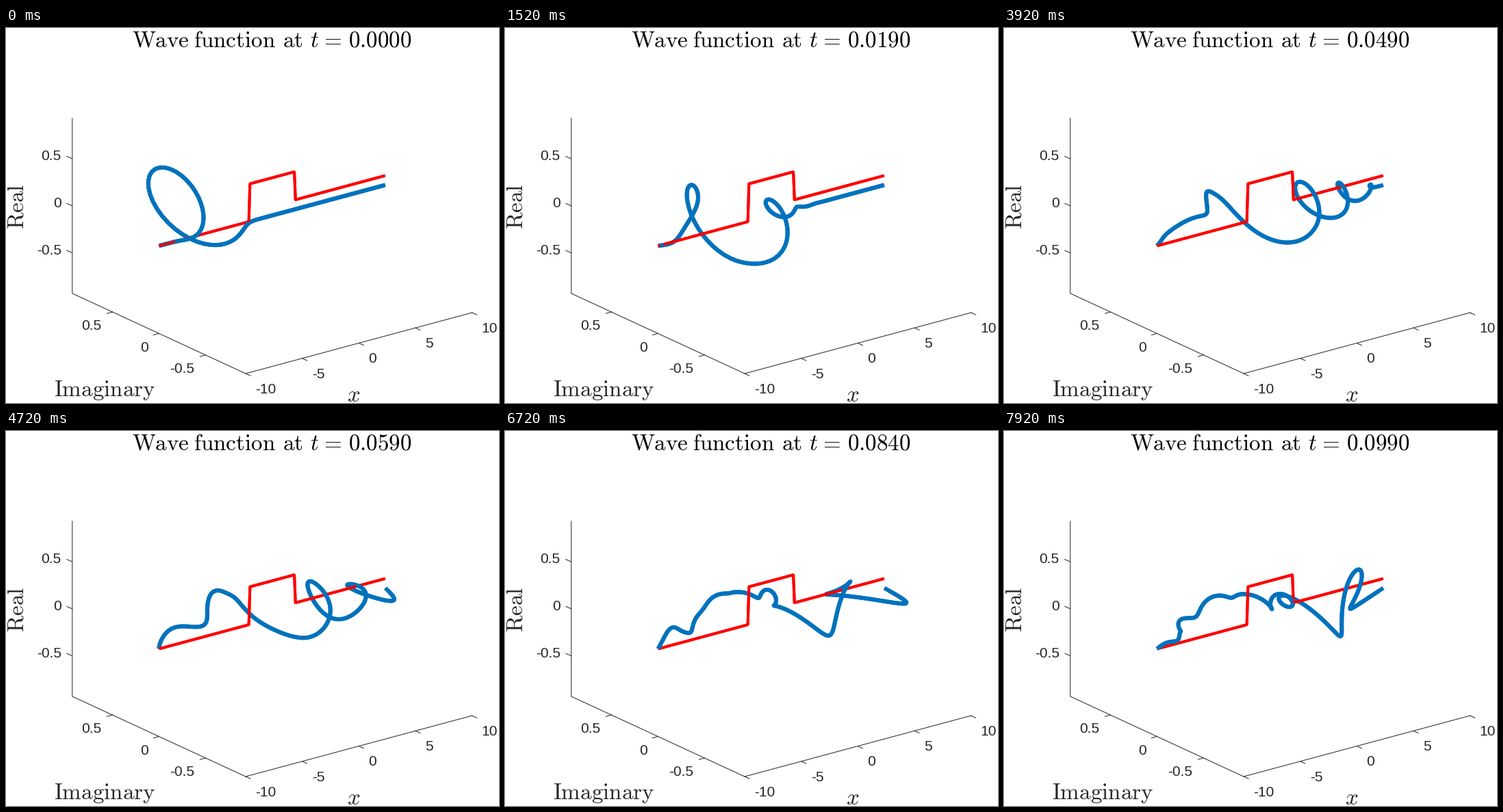
Animation, 720 px wide and 548 px high, one loop 8000 ms. Source, as a matplotlib script:

```python
import numpy as np
import matplotlib.pyplot as plt
from matplotlib.animation import FuncAnimation
from matplotlib.collections import LineCollection

plt.rcParams["mathtext.fontset"] = "cm"

W, H, DPI = 720, 548, 100
FRAMES, INTERVAL = 100, 80
PX = 72 / DPI
BLUE, RED, GREY = "#0072BD", "#FF0000", "#262626"

# Natural units (hbar = m = 1); the clock shows a hundredth of natural time
DT = 0.001
TIME_SCALE = 100

x = np.linspace(-10, 10, 200)
dx = x[1] - x[0]
V = np.where(x > 2, 0.1, np.where(x > -2, 0.4, 0.0))
psi0 = np.pi ** -0.25 * np.exp(-(x + 5) ** 2 / 2 + 1j * x)

# Evolve exactly in the energy eigenbasis, with walls at both ends
hop = 0.5 / dx ** 2
n = len(x) - 2
ham = np.diag(2 * hop + V[1:-1]) - hop * (np.eye(n, k=1) + np.eye(n, k=-1))
energy, modes = np.linalg.eigh(ham)
coef = modes.T @ psi0[1:-1]


def wave(t):
    psi = np.zeros(len(x), complex)
    psi[1:-1] = modes @ (coef * np.exp(-1j * energy * t * TIME_SCALE))
    return psi


# Orthographic view
LIM = 0.931
CENTRE = np.array([388.2, 273.4])
EX, EI, ER = np.array([[16.53, -4.45], [-136.0, -62.9], [0, -137.5]])


def project(x, im, re):
    x, im, re = np.broadcast_arrays(x, im, re)
    return CENTRE + x[..., None] * EX + im[..., None] * EI + re[..., None] * ER


def nearness(x, im, re):
    return -11.8 * x - 166.8 * im + 51.9 * re


def pieces(im, re):
    """Overlapping three-point strokes and their nearness to the viewer."""
    p = project(x, im, re)
    return np.stack([p[:-2], p[1:-1], p[2:]], axis=1), nearness(x, im, re)[1:-1]


fig = plt.figure(figsize=(W / DPI, H / DPI), dpi=DPI, facecolor="white")
ax = fig.add_axes([0, 0, 1, 1])
ax.set_xlim(-0.5, W - 0.5)
ax.set_ylim(H - 0.5, -0.5)
ax.axis("off")


def line(points):
    ax.plot(*np.transpose(points), color=GREY, lw=PX)


def tick(pos, step, text, offset, ha):
    line([pos, pos + np.array(step)])
    ax.text(*(pos + np.array(offset)), text, ha=ha, va="center_baseline",
            family="Liberation Sans", size=21 * PX, color=GREY)


def latex(px, py, text, color=GREY, **kw):
    return ax.text(px, py, f"${text}$", size=33.1 * PX, color=color, **kw)


line([project(-10, LIM, LIM), project(-10, LIM, -LIM),
      project(-10, -LIM, -LIM), project(10, -LIM, -LIM)])
for v in (-10, -5, 0, 5, 10):
    tick(project(v, -LIM, -LIM), (7, 3.2), str(v), (14, 21.5), "left")
for v, label in ((-0.5, "-0.5"), (0, "0"), (0.5, "0.5")):
    tick(project(-10, v, -LIM), (-8, 2.2), label, (-16, 19), "right")
    tick(project(-10, LIM, v), (-8, -3.5), label, (-16, -5.5), "right")

latex(183.5, 27, r"\mathrm{Wave}", "black")
latex(273.5, 27, r"\mathrm{function}", "black")
latex(403, 27, r"\mathrm{at}", "black")
latex(443.5, 27, "t", "black")
latex(458.4, 27, "=", "black")
clock = latex(500, 27, "0.0000", "black")
latex(69, 538, r"\mathrm{Imaginary}")
latex(507, 545.5, "x", ha="center")
latex(25, 260, r"\mathrm{Real}", rotation=90, rotation_mode="anchor",
      ha="center", va="baseline")

curves = LineCollection([], capstyle="butt", joinstyle="round", zorder=3)
ax.add_collection(curves, autolim=False)

red_strokes, red_near = pieces(0 * x, V)
red_near = red_near + 0.1
colors = np.array([BLUE] * n + [RED] * n)
widths = np.repeat([6 * PX, 4 * PX], n)


def update(i):
    t = i * DT
    psi = wave(t)
    strokes, near = pieces(psi.imag, psi.real)
    order = np.argsort(np.concatenate([near, red_near]), kind="stable")
    curves.set_segments(np.concatenate([strokes, red_strokes])[order])
    curves.set_color(colors[order])
    curves.set_linewidth(widths[order])
    clock.set_text(f"${t:.4f}$")
    return curves, clock


anim = FuncAnimation(fig, update, frames=FRAMES, interval=INTERVAL,
                     repeat=True, repeat_delay=0, blit=False)
plt.show()
```
